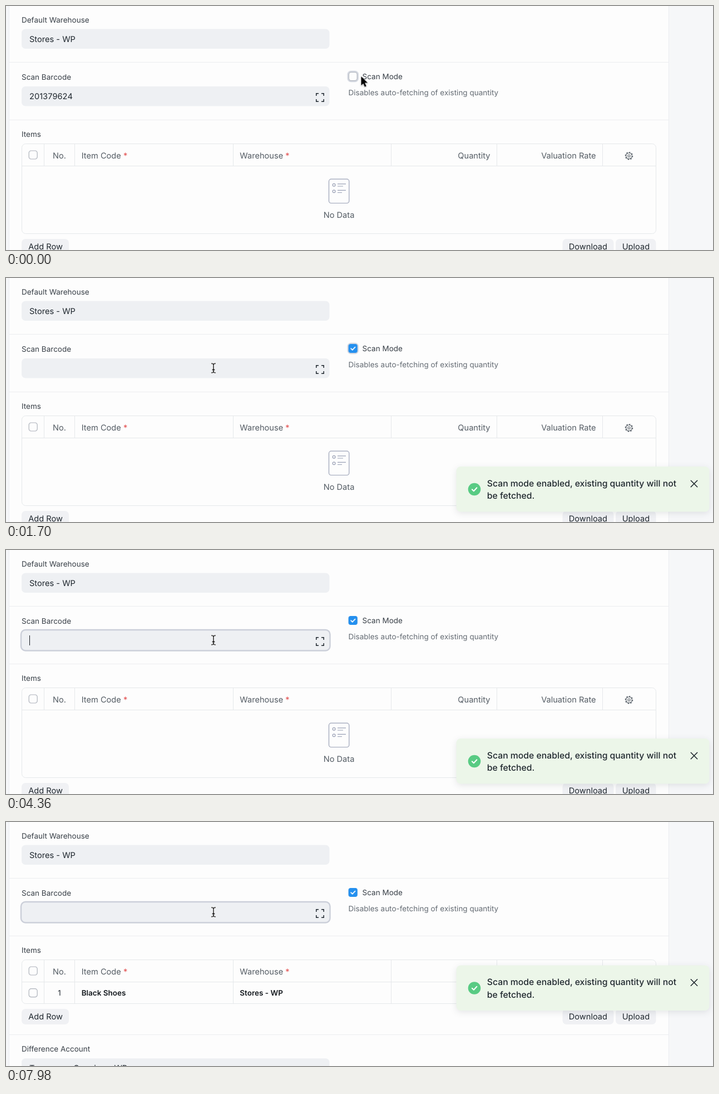
Write an HTML page that moves like this. It is 1271 px wide and 440 px high and loops after 8000 ms.

```html
<!DOCTYPE html>
<html lang="en">
<head>
<meta charset="utf-8">
<title>Scan mode</title>
<style>
html, body { margin: 0; width: 100%; height: 100%; overflow: hidden; background: #f6f7f9; }
svg, .typed { position: absolute; left: 0; top: 0; }
svg { width: 1271px; height: 440px; }
svg, .typed {
  font-family: Inter, sans-serif;
  font-optical-sizing: none;
  text-rendering: geometricPrecision;
}

.s { font-size: 13.5px; }
.m { font-size: 14.625px; }
.label { fill: #383f47; }
.help { fill: #636a72; }
.head { fill: #545c64; }
.ink { fill: #1f272e; }
.bold { font-weight: 600; fill: #14191e; }
.req { fill: #e24c4c; }
.mid { text-anchor: middle; }
.end { text-anchor: end; }
.field { fill: #eef0f3; }
.btn { fill: #f0f1f4; }
.rule { stroke: #ecedf0; }
.grid { fill: none; stroke: #e5e8ea; }
.box { fill: #fdfdfd; stroke: #adb2bb; stroke-width: 1.2; }
.line { fill: none; stroke: #9aa1b6; stroke-width: 1.2; }
.halo { fill: none; stroke: #d3d7e0; stroke-width: 2.4; }

/* One shared 8 s timeline; hard changes use step-end. */
.hard { animation: 8s step-end infinite; }
.checked { animation-name: checked; }
.checkFocus { animation-name: checkFocus; }
.fieldFocus { animation-name: fieldFocus; }
.before { animation-name: before; }
.after { animation-name: after; }
.below { animation-name: below; }
.lift { animation-name: lift; }
.caret { animation-name: caret; }
.arrowShape { animation-name: arrowShape; }
.beamShape { animation-name: beamShape; }
.toast { transform-origin: 1037px 381px; animation: toast 8s infinite; }
.pointer { animation: pointer 8s infinite; }

@keyframes checked { 0% { opacity: 0 } 10.75%, 100% { opacity: 1 } }
@keyframes checkFocus { 0% { opacity: 1 } 38%, 100% { opacity: 0 } }
@keyframes fieldFocus { 0% { opacity: 0 } 38%, 100% { opacity: 1 } }
@keyframes before { 0% { opacity: 1 } 97.75%, 100% { opacity: 0 } }
@keyframes after { 0% { opacity: 0 } 97.75%, 100% { opacity: 1 } }
@keyframes below { 0% { transform: none } 97.75%, 100% { transform: translateY(-83px) } }
@keyframes lift { 0% { transform: none } 97.75%, 100% { transform: translateY(-81.5px) } }
@keyframes caret {
  0%, 44.25%, 56.75%, 69.25%, 81.75%, 95.5%, 100% { opacity: 0 }
  38%, 50.5%, 63%, 75.5%, 83.25% { opacity: 1 }
}
@keyframes arrowShape { 0% { opacity: 1 } 16.5%, 100% { opacity: 0 } }
@keyframes beamShape { 0% { opacity: 0 } 16.5%, 100% { opacity: 1 } }
@keyframes pointer {
  0% { transform: translate(638.5px, 127px) }
  11.25% { transform: translate(638.5px, 127px); animation-timing-function: ease-in }
  15.5% { transform: translate(408.5px, 183px); animation-timing-function: ease-out }
  20%, 100% { transform: translate(373px, 162.5px) }
}
@keyframes toast {
  0%, 12.075% { transform: translateX(2000px) scale(.8); opacity: .7; animation-timing-function: ease }
  18.075% { transform: translateX(0) scale(.8); opacity: .7; animation-timing-function: ease }
  19.575%, 100% { transform: none; opacity: 1 }
}

.typed {
  left: 42px; top: 150px; height: 25px;
  display: flex; align-items: center;
  color: #1f272e; white-space: nowrap;
}
.typed b {
  font-weight: 400;
  animation: digit 8s step-end calc(-1340ms + var(--i) * 40ms) infinite;
}
.caret { width: 1px; height: 18px; background: #14191e; }
.digits { display: flex; align-items: baseline; }
@keyframes digit { 0% { font-size: 14.625px } 15%, 100% { font-size: 0 } }
</style>
</head>
<body>
<svg viewBox="0 0 1271 440">
  <defs>
    <rect id="checkbox" class="box" x="-7.5" y="-7.5" width="15" height="15" rx="4"/>
    <path id="tick" d="M-3.6 .2 L-1 2.8 L3.8 -2.4" fill="none" stroke="#fff" stroke-width="1.7" stroke-linecap="round" stroke-linejoin="round"/>
  </defs>

  <rect x="5.5" y="-5" width="1186" height="450" fill="#fdfdfd" stroke="#ebecf1"/>
  <path class="rule" d="M6 101.5H1191M6 205.5H1191"/>

  <text class="s label" x="28" y="30">Default Warehouse</text>
  <rect class="field" x="28" y="41.5" width="553.5" height="35.5" rx="7"/>
  <text class="m ink" x="42" y="64.8">Stores - WP</text>

  <text class="s label" x="28" y="133.3">Scan Barcode</text>
  <rect class="field" x="28" y="145" width="553.5" height="35.5" rx="7"/>
  <rect class="halo hard fieldFocus" style="stroke:#cbcfd9" x="27" y="144" width="555.5" height="37.5" rx="8"/>
  <path d="M557.8 162V157.8H562M567 157.8H571.2V162M571.2 168V172.2H567M562 172.2H557.8V168" fill="none" stroke="#1f272e" stroke-width="1.5"/>

  <g transform="translate(623.7 127)">
    <rect class="halo hard checkFocus" x="-9" y="-9" width="18" height="18" rx="5.2"/>
    <use href="#checkbox"/>
    <g class="hard checked">
      <rect x="-8" y="-8" width="16" height="16" rx="4" fill="#2490ef"/>
      <use href="#tick"/>
    </g>
  </g>
  <text class="s label" x="640.6" y="131.8">Scan Mode</text>
  <text class="s help" x="615.5" y="160.7">Disables auto-fetching of existing quantity</text>

  <text class="s label" x="28" y="236.4">Items</text>
  <path class="grid" d="M68.5 249V288M123.5 249V288M408.5 249V288M692.5 249V288M882.5 249V288M1072.5 249V288M29 288.5H1168"/>
  <use href="#checkbox" x="48.7" y="268.5"/>
  <g class="m head">
    <text class="mid" x="96" y="274.5">No.</text>
    <text x="135.7" y="274.5">Item Code <tspan class="req">*</tspan></text>
    <text x="420.3" y="274.5">Warehouse <tspan class="req">*</tspan></text>
    <text class="end" x="870.6" y="274.5">Quantity</text>
    <text class="end" x="1060.6" y="274.5">Valuation Rate</text>
  </g>
  <g transform="translate(1120 270.3)" fill="none" stroke="#5b636b">
    <circle r="6.3" stroke-width="2" pathLength="16" stroke-dasharray="1"/>
    <circle r="5.3" fill="#fdfdfd" stroke-width="1.1"/>
    <circle r="2.1" stroke-width="1.1"/>
  </g>

  <g class="hard before">
    <rect class="grid" x="28.5" y="248.5" width="1140" height="162" rx="7"/>
    <g class="line">
      <rect x="580.5" y="312.2" width="36.3" height="43.3" rx="4"/>
      <circle cx="589.6" cy="322.7" r="2.4"/>
      <circle cx="589.6" cy="334.2" r="2.4"/>
      <path d="M596 320.8H611M596 325H606M596 332.3H611M596 336.5H604"/>
    </g>
    <text class="m head mid" x="598.5" y="382.3">No Data</text>
  </g>

  <g class="hard after">
    <rect class="grid" x="28.5" y="248.5" width="1140" height="79" rx="7"/>
    <path class="grid" d="M68.5 289V327M123.5 289V327M408.5 289V327M692.5 289V327M882.5 289V327M1072.5 289V327"/>
    <use href="#checkbox" x="48.7" y="308.2"/>
    <text class="s ink mid" x="96" y="312.8">1</text>
    <text class="s bold" x="135.7" y="312.8">Black Shoes</text>
    <text class="s bold" x="420.3" y="312.8">Stores - WP</text>
  </g>

  <g class="hard below">
    <rect class="btn" x="28" y="420" width="85" height="28" rx="7"/>
    <rect class="btn" x="1000.5" y="420" width="92" height="28" rx="7"/>
    <rect class="btn" x="1096" y="420" width="72.5" height="28" rx="7"/>
    <g class="m ink mid">
      <text x="71" y="439.3">Add Row</text>
      <text x="1046.4" y="439.3">Download</text>
      <text x="1132.4" y="439.3">Upload</text>
    </g>
    <path class="rule" d="M6 466.5H1191"/>
    <text class="s label" x="28" y="497.4">Difference Account</text>
    <rect class="field" x="28" y="509.3" width="553.5" height="35.5" rx="7"/>
    <text class="m ink" x="42" y="531.6">Temporary Opening - WP</text>
  </g>

  <g class="hard lift">
    <g class="toast">
      <rect x="809.5" y="340" width="455" height="81.5" rx="8" fill="#ecf6e9" style="filter:drop-shadow(0 3px 6px rgba(20,30,40,.1))"/>
      <circle cx="842" cy="381" r="11.3" fill="#58cb83"/>
      <use href="#tick" transform="translate(842 381) scale(1.15)"/>
      <g class="ink" font-size="15.75" font-weight="500">
        <text x="864.8" y="375.7">Scan mode enabled, existing quantity will not</text>
        <text x="864.8" y="398.2">be fetched.</text>
      </g>
      <path d="M1231.3 365.3L1242.7 376.7M1242.7 365.3L1231.3 376.7" stroke="#1f272e" stroke-width="1.6" stroke-linecap="round"/>
    </g>
  </g>

  <g class="pointer">
    <path class="hard arrowShape" d="M0 0V16.2L3.8 12.7L6.4 18.7L9.2 17.5L6.6 11.6H11.6Z" fill="#000" stroke="#fff" stroke-width="1.2" stroke-linejoin="round" paint-order="stroke" style="filter:drop-shadow(0 1px 1px rgba(0,0,0,.25))"/>
    <g class="hard beamShape" fill="none" stroke-linecap="round">
      <path id="beam" d="M-3.6 -8.4Q0 -8.4 0 -6Q0 -8.4 3.6 -8.4M-3.6 8.4Q0 8.4 0 6Q0 8.4 3.6 8.4M0 -6V6M-2 3H2" stroke="#fff" stroke-width="3"/>
      <path d="M-3.6 -8.4Q0 -8.4 0 -6Q0 -8.4 3.6 -8.4M-3.6 8.4Q0 8.4 0 6Q0 8.4 3.6 8.4M0 -6V6M-2 3H2" stroke="#000" stroke-width="1.3"/>
    </g>
  </g>
</svg>

<div class="typed m"><span class="digits hard before"></span><span class="caret hard"></span></div>

<script>
// Each digit gets its own place in the typing order.
document.querySelector('.digits').innerHTML =
  [...'9780201379624'].map((d, i) => `<b style="--i:${i}">${d}</b>`).join('');
</script>
</body>
</html>
```
